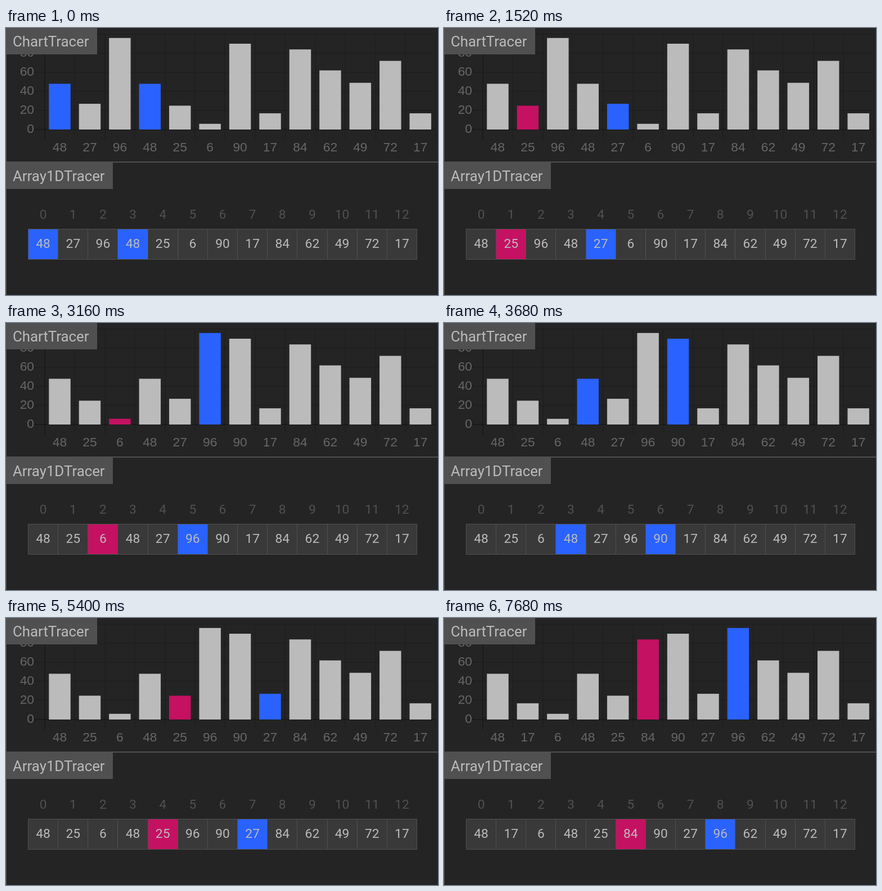
An HTML page with a canvas that plays this animation: 768x476 px, repeating every 8000 ms.

```html
<!DOCTYPE html>
<html lang="en">
<head>
<meta charset="utf-8">
<title>Shell sort</title>
<style>
  html, body { margin: 0; width: 100%; height: 100%; overflow: hidden; background: #242424; }
  canvas { display: block; }
</style>
</head>
<body>
<canvas id="stage" width="768" height="476"></canvas>
<script>
const ctx = document.getElementById('stage').getContext('2d');
const LOOP = 8000;
const BLUE = '#2962ff', RED = '#c51162', GREY = '#bbb', BORDER = '#505050';
const AXIS_FONT = '22.8px "Liberation Sans", Arial, sans-serif';
const CELL_FONT = '22.8px Roboto, sans-serif';
const TITLE_FONT = '25.8px Roboto, sans-serif';
const START = [48, 27, 96, 48, 25, 6, 90, 17, 84, 62, 49, 72, 17];

// Each step: start time, compared (blue) indices, then the written (red) index and its value.
const STEPS = [
  { at: 0, blue: [0, 3] },
  { at: 320, blue: [1, 4] },
  { at: 880, blue: [1], red: 4, value: 27 },
  { at: 1440, blue: [4], red: 1, value: 25 },
  { at: 2000, blue: [2, 5] },
  { at: 2560, blue: [2], red: 5, value: 96 },
  { at: 3120, blue: [5], red: 2, value: 6 },
  { at: 3680, blue: [3, 6] },
  { at: 4240, blue: [4, 7] },
  { at: 4800, blue: [4], red: 7, value: 27 },
  { at: 5360, blue: [7], red: 4, value: 25 },
  { at: 5920, blue: [7], red: 1, value: 17 },
  { at: 6480, blue: [5, 8] },
  { at: 7040, blue: [5], red: 8, value: 96 },
  { at: 7600, blue: [8], red: 5, value: 84 }
];

function rect(x, y, w, h, color) {
  ctx.fillStyle = color;
  ctx.fillRect(x, y, w, h);
}

function text(str, x, y, font, color, align = 'center') {
  ctx.font = font;
  ctx.fillStyle = color;
  ctx.textAlign = align;
  ctx.fillText(str, x, y);
}

function drawChart(values, colorOf) {
  const left = 68.8, pitch = 53.43, base = 181, unit = 1.7, barWidth = pitch * 0.72;
  for (let v = 0; v <= 100; v += 20) {
    const y = base - v * unit;
    rect(50, y - 1, 713, 2, `rgba(0,0,0,${v ? 0.1 : 0.25})`);
    if (v < 100) text(v, 50, y + 6, AXIS_FONT, '#666', 'right');
  }
  for (let i = 0; i <= values.length; i++) {
    rect(Math.round(left + i * pitch) - 1, 11, 2, 188, `rgba(0,0,0,${i ? 0.1 : 0.25})`);
  }
  values.forEach((value, i) => {
    const center = left + (i + 0.5) * pitch, height = value * unit;
    rect(center - barWidth / 2, base - height, barWidth, height, colorOf(i) || GREY);
    text(value, center, 220, AXIS_FONT, '#666');
  });
}

function drawArray(values, colorOf) {
  const left = 39.5, top = 358.5, width = 53.15, height = 54;
  ctx.strokeStyle = BORDER;
  ctx.lineWidth = 1;
  values.forEach((value, i) => {
    const x = Math.round(left + i * width - 0.5) + 0.5, center = left + (i + 0.5) * width;
    const w = Math.round(left + (i + 1) * width - 0.5) + 0.5 - x;
    rect(x, top, w, height, colorOf(i) || '#393939');
    ctx.strokeRect(x, top, w, height);
    text(i, center, 340, CELL_FONT, BORDER);
    text(value, center, 392, CELL_FONT, GREY);
  });
}

function drawTitle(label, y, width) {
  rect(0, y, width, 47, BORDER);
  text(label, 12, y + 33, TITLE_FONT, GREY, 'left');
}

function draw(now) {
  const done = STEPS.filter(step => step.at <= now % LOOP);
  const current = done[done.length - 1];
  const values = START.slice();
  for (const { red, value } of done) if (red !== undefined) values[red] = value;
  const colorOf = i => i === current.red ? RED : current.blue.includes(i) ? BLUE : null;

  rect(0, 0, 768, 476, '#242424');
  drawChart(values, colorOf);
  drawArray(values, colorOf);
  rect(0, 0, 1, 476, BORDER);
  rect(0, 238, 768, 2, BORDER);
  drawTitle('ChartTracer', 0, 162);
  drawTitle('Array1DTracer', 240, 190);
}

function tick() {
  draw(performance.now());
  requestAnimationFrame(tick);
}
tick();
</script>
</body>
</html>
```
